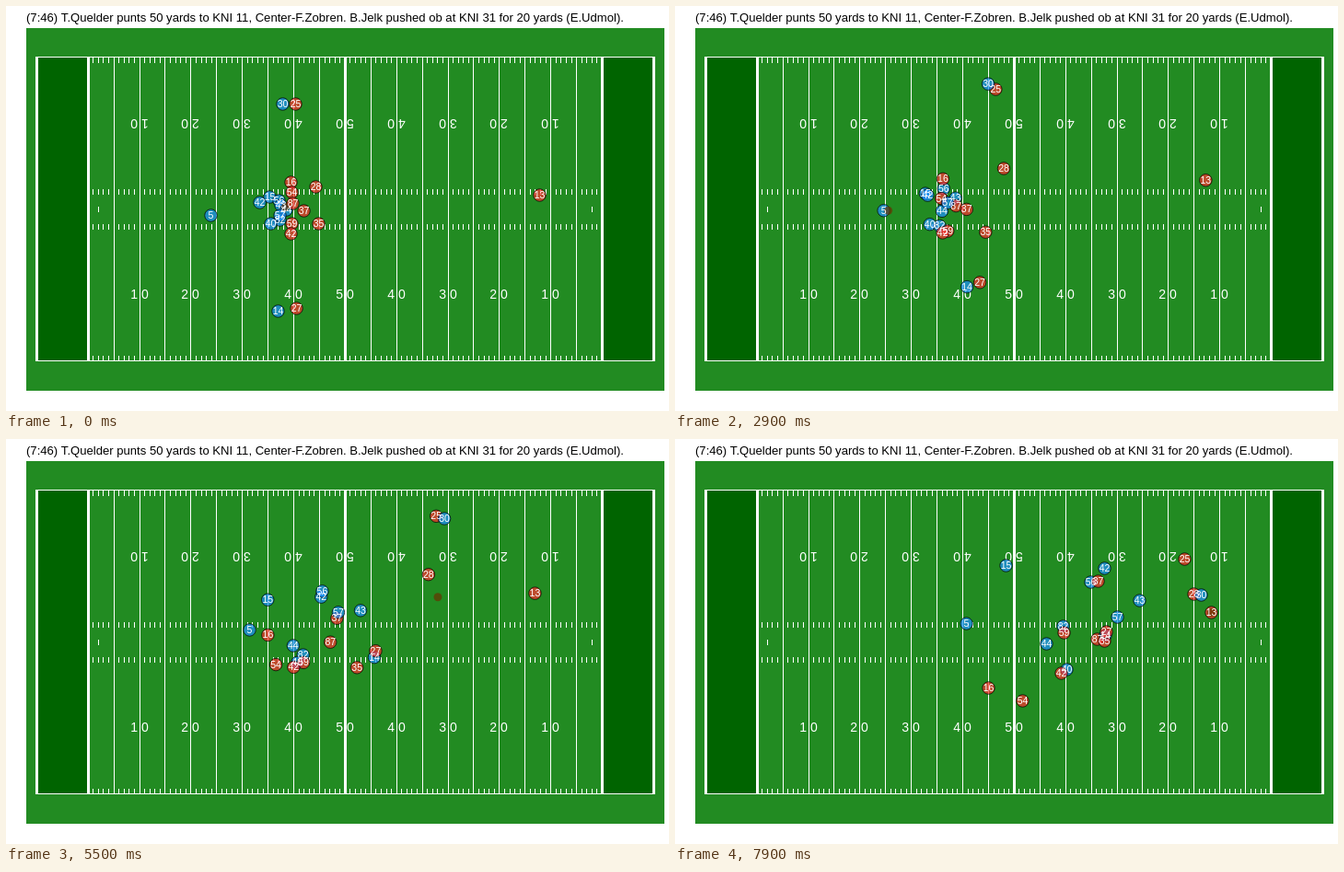
An HTML page with a canvas for the animation above (8000 ms loop, 720x440 px).

```html
<!DOCTYPE html>
<html lang="en">
<head>
<meta charset="utf-8">
<title>Punt return</title>
<style>
  html, body { margin: 0; width: 100%; height: 100%; overflow: hidden; background: #fff; }
  canvas { display: block; }
</style>
</head>
<body>
<canvas id="stage" width="720" height="440"></canvas>
<script>
const ctx = document.getElementById('stage').getContext('2d');
const FONT = '"Liberation Sans", Arial, sans-serif';
const BLUE = '#1e90ff', RED = '#ff3030', BROWN = '#663300';
const LOOP = 8000, STEP = 100;
const SNAP = 1200, CATCH_SNAP = 2200, KICK = 3050, MIDWAY = 4700, END = 7900;
const MIDWAY_DRIVE = 1.4;
const GOAL = 89.22, YARD = 5.583;
const TITLE = '(7:46) T.Quelder punts 50 yards to KNI 11, Center-F.Zobren. ' +
  'B.Jelk pushed ob at KNI 31 for 20 yards (E.Udmol).';

// Each player has three key points: at the snap, midway and at the end.
const players = [];

function player(color, number, ...points) {
  const p = { color, number, points };
  players.push(p);
  return p;
}

player(BLUE, 15, [286, 207], [269, 186], [359, 137]);
player(BLUE, 42, [275, 213], [308, 183], [466, 140]);
player(BLUE, 56, [296, 211], [315, 173], [451, 155]);
player(BLUE, 43, [298, 216], [349, 192], [504, 175]);
player(BLUE, 44, [304, 221], [292, 224], [403, 222]);
player(BLUE, 82, [297, 232], [299, 240], [421, 203]);
player(BLUE, 40, [287, 236], [290, 240], [425, 250]);
const punter = player(BLUE, 5, [222, 227], [248, 211], [316, 200]);
player(RED, 28, [336, 196], [421, 149], [563, 168]);
player(RED, 16, [309, 191], [276, 198], [340, 270]);
player(RED, 54, [310, 202], [278, 231], [377, 284]);
player(RED, 87, [311, 214], [325, 220], [458, 217]);
player(RED, 37, [323, 222], [334, 206], [459, 154]);
player(RED, 59, [310, 236], [301, 248], [422, 210]);
player(RED, 42, [309, 247], [290, 246], [419, 254]);
player(BLUE, 14, [295, 331], [372, 254], [467, 213]);
player(RED, 35, [339, 236], [358, 252], [466, 219]);
player(RED, 27, [315, 328], [376, 247], [468, 209]);
player(RED, 25, [314, 106], [429, 77], [553, 130]);
player(BLUE, 57, [297, 227], [328, 192], [480, 193]);
player(BLUE, 30, [300, 106], [433, 72], [571, 169]);
const returner = player(RED, 13, [579, 205], [573, 168], [582, 188]);

const mix = (a, b, u) => a + (b - a) * u;

// Starts at rest, passes midway at the boosted mean speed, then bends steadily to the end.
function run(start, middle, end, t) {
  const speed = MIDWAY_DRIVE * (end - start) / (END - SNAP);
  if (t < MIDWAY) {
    const span = MIDWAY - SNAP, u = Math.max(0, (t - SNAP) / span);
    return mix(start, middle, u * u * (3 - 2 * u)) - u * u * (1 - u) * span * speed;
  }
  const span = END - MIDWAY, u = (t - MIDWAY) / span;
  return middle + speed * span * u + (end - middle - speed * span) * u * u;
}

function playerAt({ points: [a, b, c] }, t) {
  return { x: run(a[0], b[0], c[0], t), y: run(a[1], b[1], c[1], t) };
}

// Snapped to the punter, held, then kicked in an arc slowed by drag.
function ballAt(t) {
  const line = { x: 303, y: 218 };
  if (t < KICK) {
    const u = Math.min(1, Math.max(0, (t - SNAP) / (CATCH_SNAP - SNAP)));
    const hands = playerAt(punter, t);
    return { x: mix(line.x, hands.x + 5, u), y: mix(line.y, hands.y, u) };
  }
  const from = playerAt(punter, KICK), to = playerAt(returner, END);
  const u = (t - KICK) / (END - KICK);
  return {
    x: mix(from.x + 5, to.x, 1 - (1 - u) ** 1.6),
    y: mix(from.y, to.y, u) - 132 * u * (1 - u)
  };
}

function rect(color, x, y, w, h) {
  ctx.fillStyle = color;
  ctx.fillRect(x, y, w, h);
}

function text(label, x, y, size, color = '#fff', align = 'center') {
  ctx.font = `${size}px ${FONT}`;
  ctx.fillStyle = color;
  ctx.textAlign = align;
  ctx.fillText(label, x, y);
}

function disc({ x, y }, radius, color, outlined) {
  ctx.beginPath();
  ctx.arc(x + 0.5, y + 0.5, radius, 0, 2 * Math.PI);
  ctx.fillStyle = color;
  ctx.fill();
  if (outlined) ctx.stroke();
}

function drawField() {
  rect('#fff', 0, 0, 720, 440);
  text(TITLE, 22, 17, 13.1, '#000', 'left');
  rect('#228b22', 22, 24, 693, 394);
  for (const x of [34, 647]) rect('#006400', x, 56, 56, 329);
  for (const y of [55, 385]) rect('#fff', 32, y, 673, 1);
  for (const x of [32, 702]) rect('#fff', x, 55, 3, 331);

  for (let yard = 0; yard <= 100; yard++) {
    const x = Math.floor(GOAL + YARD * yard);
    if (yard % 50 === 0) rect('#fff', x - 1, 55, 3, 331);
    else if (yard % 5 === 0) rect('#fff', x, 55, 1, 331);
    else for (const y of [56, 199, 237, 380]) rect('#fff', x, y, 1, 6);
    if (yard === 2 || yard === 98) rect('#fff', x, 218, 1, 6);

    if (yard % 10 === 0 && yard % 100) {
      const label = `${Math.min(yard, 100 - yard) / 10} 0`;
      text(label, x, 318, 14);
      ctx.save();
      ctx.translate(x, 123);
      ctx.rotate(Math.PI);
      text(label, 0, 0, 14);
      ctx.restore();
    }
  }
}

function draw(t) {
  drawField();
  const spots = players.map(p => playerAt(p, t));
  ctx.globalAlpha = 0.7;
  ctx.strokeStyle = '#000';
  ctx.lineWidth = 1;
  players.forEach((p, i) => disc(spots[i], 6.75, p.color, true));
  disc(ballAt(t), 4.5, BROWN, false);
  ctx.globalAlpha = 1;
  players.forEach((p, i) => text(p.number, spots[i].x + 0.5, spots[i].y + 4, 10.5));
}

function tick() {
  const t = performance.now() % LOOP;
  draw(Math.floor(t / STEP) * STEP);
  requestAnimationFrame(tick);
}
tick();
</script>
</body>
</html>
```
